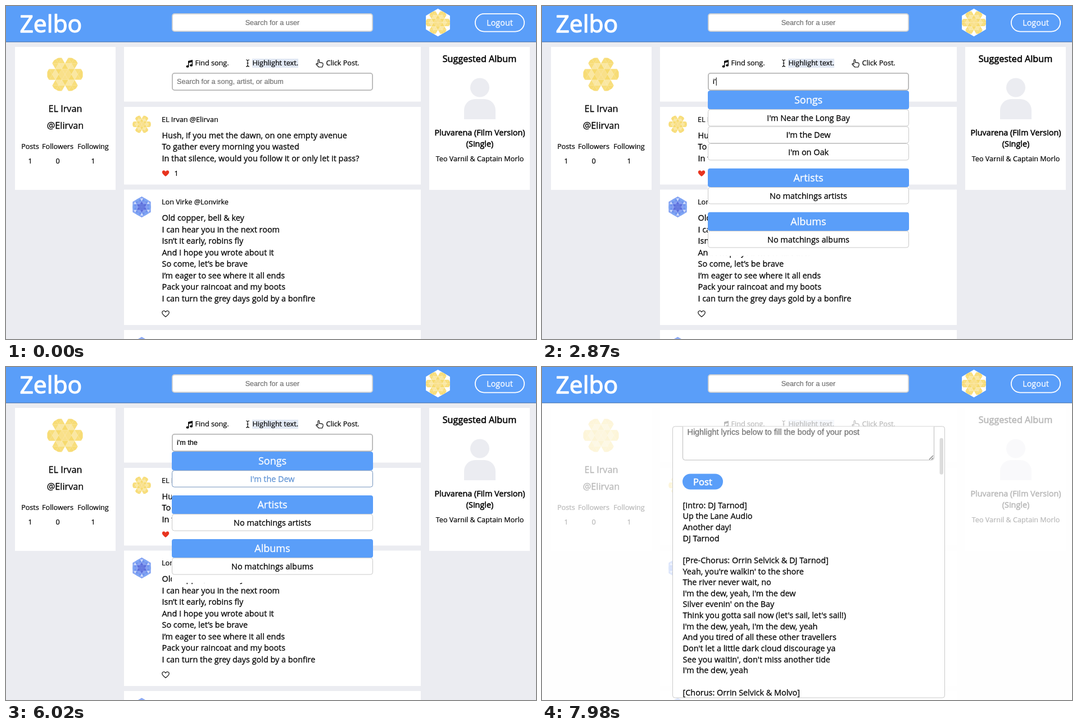
Animation, 943 px wide and 594 px high, one loop 8000 ms. Source, as an HTML page with a canvas:

```html
<!DOCTYPE html>
<html lang="en">
<head>
<meta charset="utf-8">
<title>Lyric feed</title>
<style>
html, body { margin: 0; width: 100%; height: 100%; overflow: hidden; background: #ebecf1; }
canvas { display: block; width: 943px; height: 594px; }
</style>
</head>
<body>
<canvas id="stage"></canvas>
<script>
const W = 943, H = 594, LOOP = 8000;
const SANS = '"Open Sans", sans-serif';
const FIELD = '"Liberation Sans", Arial, sans-serif';
const BLUE = '#5a9ef9', PAGE = '#ebecf1', HINT = '#757575';

const canvas = document.getElementById('stage');
const dpr = window.devicePixelRatio || 1;
canvas.width = Math.round(W * dpr);
canvas.height = Math.round(H * dpr);
const ctx = canvas.getContext('2d');

// Timeline in ms
const FOCUS = 2310, HOVER = 5600, OPEN = 6650;
const QUERY = "i'm the ";
const KEYS = [2560, 2800, 3180, 3400, 3640, 3800, 3960, 4440];
const SCROLL = { from: 7230, to: 7650, px: 50 };

const SONGS = ["I'm Near the Long Bay", "I'm the Dew", "I'm on Oak"];
const POST_1 = [
  'Hush, if you met the dawn, on one empty avenue',
  'To gather every morning you wasted',
  'In that silence, would you follow it or only let it pass?'
];
const POST_2 = [
  'Old copper, bell & key',
  'I can hear you in the next room',
  'Isn’t it early, robins fly',
  'And I hope you wrote about it',
  'So come, let’s be brave',
  'I’m eager to see where it all ends',
  'Pack your raincoat and my boots',
  'I can turn the grey days gold by a bonfire'
];
const LYRICS = [
  '[Intro: DJ Tarnod]',
  'Up the Lane Audio',
  'Another day!',
  'DJ Tarnod',
  '',
  '[Pre-Chorus: Orrin Selvick & DJ Tarnod]',
  "Yeah, you're walkin' to the shore",
  'The river never wait, no',
  "I'm the dew, yeah, I'm the dew",
  "Silver evenin' on the Bay",
  "Think you gotta sail now (let's sail, let's sail!)",
  "I'm the dew, yeah, I'm the dew, yeah",
  'And you tired of all these other travellers',
  "Don't let a little dark cloud discourage ya",
  "See you waitin', don't miss another tide",
  "I'm the dew, yeah",
  '',
  '[Chorus: Orrin Selvick & Molvo]'
];

const clamp = v => Math.max(0, Math.min(1, v));
const ramp = (t, a, b) => clamp((t - a) / (b - a));

// y is the middle of the capitals; heavy thickens the strokes without widening the line
function text(str, x, y, size, { color = '#000', align = 'left', font = SANS, heavy = 0.018 } = {}) {
  ctx.font = `${size}px ${font}`;
  ctx.fillStyle = ctx.strokeStyle = color;
  ctx.lineWidth = size * heavy;
  ctx.lineJoin = 'round';
  ctx.textAlign = align;
  ctx.fillText(str, x, y + size * 0.35);
  ctx.strokeText(str, x, y + size * 0.35);
}

const centered = (str, x, y, size, opts) => text(str, x, y, size, { align: 'center', ...opts });

function fillRect(x, y, w, h, color) {
  ctx.fillStyle = color;
  ctx.fillRect(x, y, w, h);
}

function box(x, y, w, h, r, fill, stroke, line = 1) {
  const d = stroke ? line / 2 : 0;
  ctx.beginPath();
  ctx.roundRect(x + d, y + d, w - 2 * d, h - 2 * d, r);
  if (fill) { ctx.fillStyle = fill; ctx.fill(); }
  if (stroke) { ctx.strokeStyle = stroke; ctx.lineWidth = line; ctx.stroke(); }
}

// Rows of triangles in three rings, mirrored in each sextant, cut to an upright hexagon.
// The six tones go: inner; middle centre, side; outer centre, side, corner.
const YELLOW = { back: '#fff', tones: ['#f9e08a', '#f6da6d', '#fae7a2', '#fff', '#f8de7c', '#f7dc76'] };
const INDIGO = { back: '#86a5f3', tones: ['#6478de', '#5a6bdb', '#86a0f0', '#cfdcfb', '#6f93ee', '#7fa6f4'] };

function avatar(cx, cy, radius, { back, tones }) {
  const rings = 3, row = radius * 0.81 / rings, edge = row * 2 / Math.sqrt(3);
  ctx.save();
  ctx.translate(cx, cy);
  ctx.beginPath();
  for (let i = 0; i < 6; i++) {
    const a = Math.PI * (i / 3 + 0.5);
    ctx.lineTo(radius * Math.cos(a), radius * Math.sin(a));
  }
  ctx.closePath();
  ctx.fillStyle = back;
  ctx.fill();
  ctx.clip();
  ctx.rotate(Math.PI / 6);
  for (let s = 0; s < 6; s++) {
    for (let k = 1; k <= rings; k++) {
      for (let j = 1 - k; j < k; j++) {
        const outward = (k - 1 - Math.abs(j)) % 2 === 0;
        const base = (outward ? k : k - 1) * row;
        const tip = (outward ? k - 1 : k) * row;
        const mid = j * edge / 2;
        ctx.beginPath();
        ctx.moveTo(tip, mid);
        ctx.lineTo(base, mid - edge / 2);
        ctx.lineTo(base, mid + edge / 2);
        ctx.closePath();
        ctx.fillStyle = tones[k * (k - 1) / 2 + Math.abs(j)];
        ctx.fill();
      }
    }
    ctx.rotate(Math.PI / 3);
  }
  ctx.restore();
}

function heart(x, y, filled) {
  ctx.beginPath();
  ctx.moveTo(x, y + 5.5);
  ctx.bezierCurveTo(x - 2.5, y + 3.5, x - 6.2, y + 0.8, x - 6.2, y - 2);
  ctx.bezierCurveTo(x - 6.2, y - 6, x - 1.6, y - 6.4, x, y - 3);
  ctx.bezierCurveTo(x + 1.6, y - 6.4, x + 6.2, y - 6, x + 6.2, y - 2);
  ctx.bezierCurveTo(x + 6.2, y + 0.8, x + 2.5, y + 3.5, x, y + 5.5);
  ctx.closePath();
  if (filled) { ctx.fillStyle = '#e8341f'; ctx.fill(); }
  else { ctx.strokeStyle = '#111'; ctx.lineWidth = 1.2; ctx.stroke(); }
}

function path(d, x, y, { fill, stroke = '#000' } = {}) {
  ctx.save();
  ctx.translate(x, y);
  const p = new Path2D(d);
  if (fill) { ctx.fillStyle = fill; ctx.fill(p); }
  else { ctx.strokeStyle = stroke; ctx.lineWidth = 1.1; ctx.lineJoin = 'round'; ctx.stroke(p); }
  ctx.restore();
}

function nav() {
  fillRect(0, 0, W, 64, BLUE);
  fillRect(0, 63.5, W, 1, '#3c6ca8');
  text('Zelbo', 24.5, 32, 42.6, { color: '#fff', heavy: 0.03 });
  box(295, 13, 358, 33, 4, '#fff', '#cfd2d6', 2);
  centered('Search for a user', 474, 30, 12.6, { color: HINT, font: FIELD });
  avatar(768.5, 29.5, 24.7, YELLOW);
  box(834, 13, 89, 33.5, 16, null, '#fff', 1.8);
  centered('Logout', 878.5, 30, 14.4, { color: '#fff' });
}

function profile() {
  fillRect(16, 73, 179, 255, '#fff');
  avatar(105, 122, 36.5, YELLOW);
  centered('EL Irvan', 105.5, 183, 16.2);
  centered('@Elirvan', 105.5, 213.5, 16.2);
  [['Posts', 1, 43], ['Followers', 0, 92], ['Following', 1, 155]].forEach(([label, n, x]) => {
    centered(label, x, 251, 12.6);
    centered(n, x, 276.5, 12.6);
  });
}

function album() {
  fillRect(753, 73, 179, 255, '#fff');
  centered('Suggested Album', 842.5, 94, 16.2, { heavy: 0.035 });
  ctx.fillStyle = PAGE;
  ctx.beginPath();
  ctx.arc(843, 145.5, 17, 0, 7);
  ctx.fill();
  ctx.beginPath();
  ctx.roundRect(815, 166, 56, 36, [20, 20, 0, 0]);
  ctx.fill();
  centered('Pluvarena (Film Version)', 843, 226, 14.4, { heavy: 0.035 });
  centered('(Single)', 843, 245.5, 14.4, { heavy: 0.035 });
  centered('Teo Varnil & Captain Morlo', 843, 273, 12.6);
}

function composer() {
  fillRect(210, 73, 528, 97.5, '#fff');
  // Music note, text cursor, pointing hand
  path('M4 1 L12 -1 V8.6 A2.4 2 0 1 1 10.6 7 V3 L5.4 4.4 V10.6 A2.4 2 0 1 1 4 9 Z', 320, 97, { fill: '#000' });
  path('M0 0 Q3 0 3 2 Q3 0 6 0 M3 2 V10 M0 12 Q3 12 3 10 Q3 12 6 12 M1.5 6 H4.5', 427, 96);
  path('M4 9 V2 Q4 .5 5.2 .5 Q6.4 .5 6.4 2 V6 Q7.6 5 8.8 6.2 Q10 5.4 11 6.6 Q13 6 13 8 V10.5 L11.6 14 H5.6 L1 9.4 Q.5 8 2 7.6 Z', 551, 95);
  text('Find song.', 336.5, 102, 12.6);
  fillRect(438, 94, 82, 16, '#e1e8f4');
  text('Highlight text.', 438.5, 102, 12.6);
  text('Click Post.', 569.5, 102, 12.6);
  box(295, 119, 358, 32, 4, '#fff', '#b6b6b6', 1.8);
}

function post(top, height, name, look, lines) {
  fillRect(210, top, 528, height, '#fff');
  avatar(241.5, top + 31, 18.7, look);
  text(name, 277, top + 22.5, 12.6);
  lines.forEach((line, i) => text(line, 277.5, top + 50.5 + i * 20.57, 14.4));
}

function feed() {
  post(180, 138.5, 'EL Irvan @Elirvan', YELLOW, POST_1);
  heart(284, 298.5, true);
  text('1', 299.5, 299, 12.6);
  post(327.5, 241.5, 'Lon Virke @Lonvirke', INDIGO, POST_2);
  heart(284, 549, false);
  post(578, 60, '', INDIGO, []);
}

function dropdown(query, hover) {
  const match = SONGS.filter(s => s.toLowerCase().startsWith(query.trimEnd()));
  const groups = [['Songs', match], ['Artists', ['No matchings artists']], ['Albums', ['No matchings albums']]];
  const rows = match.length + 2;
  fillRect(295, 151, 358, 3 * (33 + 14.6) + rows * 30.4, '#fff');
  let y = 151;
  groups.forEach(([title, items], g) => {
    box(295, y, 358, 33.2, 4, BLUE);
    centered(title, 474, y + 17, 18, { color: '#fff' });
    y += 33.2;
    items.forEach(item => {
      const lit = hover && g === 0;
      box(295, y, 358, 30.4, 4, '#fff', lit ? '#7393bd' : '#c9c9c9');
      centered(item, 474, y + 15.6, 14.4, { color: lit ? '#5f93d4' : '#000' });
      y += 30.4;
    });
    y += 14.4;
  });
}

function search(t) {
  const typed = KEYS.filter(k => k <= t).length;
  const query = QUERY.slice(0, typed);
  if (typed) text(query, 304, 135, 12.6, { font: FIELD });
  else text('Search for a song, artist, or album', 304, 135, 12.6, { color: HINT, font: FIELD });

  const last = typed ? KEYS[typed - 1] : FOCUS;
  if (t >= FOCUS && (t - last) % 1000 < 500) {
    ctx.font = `12.6px ${FIELD}`;
    fillRect(304.5 + ctx.measureText(query).width, 127.5, 1, 14.5, '#000');
  }
  if (typed) dropdown(query, t >= HOVER);
}

function modal(t) {
  const p = ramp(t, SCROLL.from, SCROLL.to);
  const shift = SCROLL.px * (1 - (1 - p) ** 3);
  box(232, 105.5, 485, 485, 4, '#fff', '#cacaca');
  ctx.save();
  ctx.beginPath();
  ctx.rect(233, 106.5, 483, 483);
  ctx.clip();
  ctx.translate(0, -shift);
  text("I'm the Dew", 250.5, 123.5, 16.6, { heavy: 0.035 });
  box(250, 149.5, 448, 67, 4, '#fff', '#bcbcbc');
  text('Highlight lyrics below to fill the body of your post', 258.5, 165.5, 14.4, { color: HINT, font: FIELD });
  path('M0 7 L7 0 M4 7 L7 4', 689, 208, { stroke: '#777' });
  box(250, 240.5, 72, 28, 14, BLUE);
  centered('Post', 286, 255, 16.6, { color: '#fff', heavy: 0.035 });
  LYRICS.forEach((line, i) => text(line, 250.5, 296.5 + i * 19.66, 14.4));
  ctx.restore();

  const fade = 1 - ramp(t, 7850, 8030);
  box(707.5, 120 + shift * 0.135, 6.5, 65, 3.2, `rgba(0,0,0,${0.5 * fade})`);
}

function draw(t) {
  const open = t >= OPEN;
  ctx.setTransform(dpr, 0, 0, dpr, 0, 0);
  fillRect(0, 0, W, H, open ? '#fcfcfd' : PAGE);
  profile();
  album();
  composer();
  feed();
  if (open) {
    ctx.globalAlpha = ramp(t, OPEN, OPEN + 150);
    fillRect(0, 64, W, H - 64, 'rgba(255,255,255,0.72)');
    modal(t);
    ctx.globalAlpha = 1;
  } else {
    search(t);
  }
  nav();
}

const start = performance.now();
function tick() {
  draw((performance.now() - start) % LOOP);
  requestAnimationFrame(tick);
}
tick();
</script>
</body>
</html>
```
